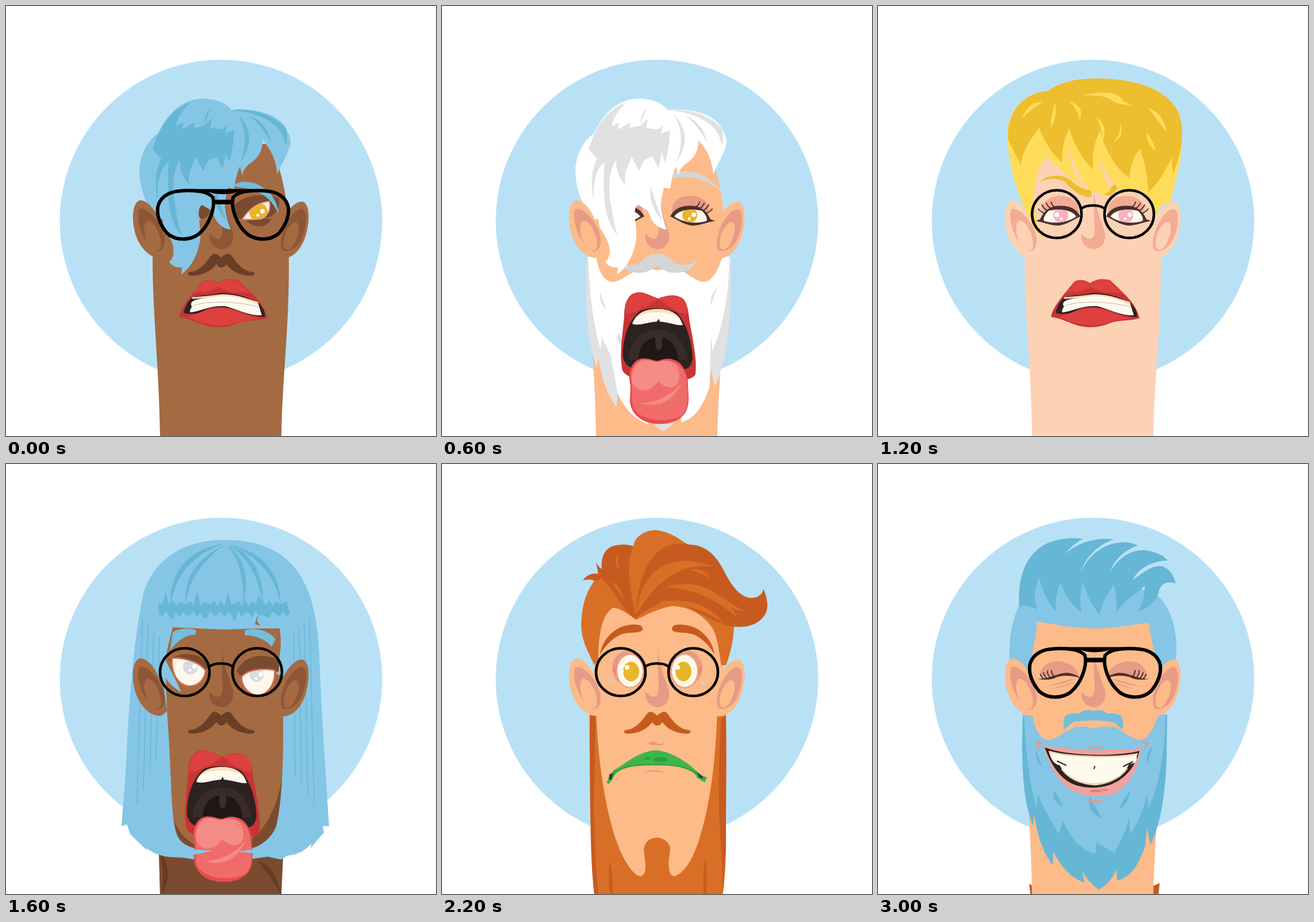
These frames come from a looping animation (748x748 px, 3.2 s). An HTML page with a canvas:

```html
<!DOCTYPE html>
<html lang="en">
<head>
<meta charset="utf-8">
<title>Mix and match faces</title>
<style>
html, body { margin: 0; width: 100%; height: 100%; overflow: hidden; background: #fff; }
canvas { display: block; width: 748px; height: 748px; }
</style>
</head>
<body>
<canvas id="stage" width="748" height="748"></canvas>
<script>
const ctx = document.getElementById('stage').getContext('2d');
const STEP = 200, DARK = '#2c2220', TOOTH = '#fffaee', CREAM = '#f9ddbc', LASH = '#4a302c';
const RED = '#de3f3f', DEEP_RED = '#c83434', GREEN = '#3fb549', DEEP_GREEN = '#2f9c43';

// base, shade, deep shade
const SKIN = {
  brown: ['#a46a41', '#8c5637', '#7b4b2f'],
  tan: ['#fcbb89', '#e69b86', '#e69b86'],
  light: ['#fdd2b4', '#f4ab96', '#f4ab96']
};
const TONE = {
  blue: ['#85c5e6', '#66b6d5'],
  white: ['#ffffff', '#e1e1e1'],
  blond: ['#ffdc5a', '#edbe2e'],
  orange: ['#d96f26', '#c75b1f']
};
const IRIS = { gold: '#e9b52a', pink: '#fbb0c2', grey: '#dadbe0' };

function fill(d, color) {
  ctx.fillStyle = color;
  ctx.fill(new Path2D(d));
}
function line(d, color, width) {
  ctx.strokeStyle = color;
  ctx.lineWidth = width;
  ctx.lineCap = 'round';
  ctx.stroke(new Path2D(d));
}
function oval(x, y, rx, ry, color) {
  ctx.fillStyle = color;
  ctx.beginPath();
  ctx.ellipse(x, y, rx, ry, 0, 0, Math.PI * 2);
  ctx.fill();
}
// Tapered strands: start, bend point, end and width of each
function leaves(color, list) {
  for (const item of list.split(',')) {
    const [x1, y1, cx, cy, x2, y2, w] = item.trim().split(' ').map(Number);
    const len = Math.hypot(x2 - x1, y2 - y1);
    const nx = (y1 - y2) / len * w, ny = (x2 - x1) / len * w;
    fill(`M${x1} ${y1}Q${cx + nx} ${cy + ny} ${x2} ${y2}Q${cx - nx} ${cy - ny} ${x1} ${y1}Z`, color);
  }
}
function eyeball(d, x, y, r, iris) {
  fill(d, '#fdf8ee');
  ctx.save();
  ctx.clip(new Path2D(d));
  oval(x, y, r, r, iris);
  glint(x + 7, y - 1);
  ctx.restore();
}
function glint(x, y) {
  oval(x, y, 4, 4, '#fff');
  oval(x - 8, y + 7, 2.5, 2.5, '#fff');
}
function both(draw, sum = 749) {
  draw();
  ctx.save();
  ctx.translate(sum, 0);
  ctx.scale(-1, 1);
  draw();
  ctx.restore();
}

function head([base]) {
  fill('M255 436C255 540 266 620 268 748L479 748C481 640 493 560 492 437L493 400C492 350 482 290 460 240L300 240C275 260 264 320 262 400Z', base);
}
function ears([base, shade]) {
  fill('M266 372C258 350 243 337 233 338C222 341 218 362 223 388C228 415 248 440 270 438L280 430L272 370Z', base);
  fill('M231 354C226 375 238 412 262 427C272 427 277 418 276 404C272 377 244 346 231 354Z', shade);
  fill('M246 373C237 378 239 400 249 417C253 425 264 430 269 421C273 408 262 375 246 373Z', base);
  fill('M482 372C492 350 508 337 518 341C529 348 528 375 522 397C516 420 500 440 481 439L470 436Z', base);
  fill('M517 354C526 360 522 395 510 412C503 423 487 430 480 424C474 405 485 375 503 358C508 354 513 352 517 354Z', shade);
  fill('M505 376C514 383 508 405 498 419C492 426 484 425 483 417C481 400 493 376 505 376Z', base);
}
function nose([, shade]) {
  fill('M376 322C377 350 388 372 395 395C397 412 388 423 375 423C362 422 352 412 354 396C361 404 369 408 374 402C380 395 374 365 376 322Z', shade);
}

const beards = {
  full([a, b], [base]) {
    const top = 'L268 436C273 465 283 480 297 480C315 478 325 464 345 457L410 457C425 463 440 479 455 480C470 480 480 460 488 436';
    fill(`M252 436${top}L503 436L502 510C500 580 490 630 474 663L468 632L465 664C452 700 440 718 416 725L415 706C406 724 396 734 384 740C372 732 362 722 355 706L359 728C335 720 318 700 305 674L304 698C290 680 277 650 272 610L269 630L262 605C254 580 248 520 252 436Z`, b);
    fill(`M254 436${top}L500 436C500 490 490 560 470 600L468 571C465 590 460 610 439 645L436 614C432 640 425 650 411 676C405 672 395 668 380 658L378 678C350 670 335 650 322 621L314 644C305 625 290 605 278 575L276 598C265 560 258 520 254 436Z`, a);
    if (a === TONE.white[0])
      fill('M290 590L306 675C318 700 335 720 359 727L355 706L415 706L416 724C440 716 452 700 465 664L468 571Z', a);
    leaves(b, '275 498 277 516 286 528 4, 478 490 469 505 468 521 4, 306 568 308 584 322 596 8, 438 568 432 587 418 602 6, 368 578 371 602 389 616 9');
    fill('M361 456Q376 463 389 456Z', base);
  },
  long([a, b], [base]) {
    fill('M257 436L494 436C496 550 493 640 494 660C494 700 490 748 488 748L265 748C260 700 258 620 257 436Z', a);
    fill('M257 436L267 437C266 540 260 620 272 748L265 748C259 700 257 620 257 436Z', b);
    fill('M486 440L494 440L494 660L488 748C490 650 474 640 486 440Z', b);
    leaves(b, '292 690 293 720 296 780 6, 458 686 457 720 458 780 6');
    fill('M268 430C272 540 290 620 305 660C318 695 335 717 345 717C358 715 354 695 351 672C352 655 365 650 374 650C386 650 398 660 397 672C393 690 392 717 405 717C420 712 435 690 445 660C462 610 475 540 479 430Z', base);
  }
};

// Left halves
const moustaches = {
  points: 'M375 438C368 432 362 428 357 434C346 449 336 462 318 463C314 468 320 470 326 469C342 468 356 462 366 449Q369 455 375 455Z',
  curl: 'M375 431C358 431 352 440 342 448C331 453 318 451 307 443C311 455 322 463 340 464C360 466 367 454 375 453Z',
  brush: 'M375 430C366 427 356 428 350 434C336 433 326 436 325 440C321 452 323 458 324 462C330 458 333 452 340 449Q358 446 375 446Z'
};

const mouths = {
  snarl() {
    fill('M301 541C303 525 322 503 341 480C350 474 360 476 369 482C380 474 394 474 404 477C425 498 448 515 455 543C440 548 420 546 405 551C385 560 365 561 345 555C330 550 315 542 301 541Z', DEEP_RED);
    fill('M325 501C335 487 342 478 350 477C358 476 364 480 369 484C380 475 392 475 403 478L426 500C410 496 390 502 369 488C355 502 340 494 325 501Z', RED);
    fill('M314 541C345 531 350 527 375 526C400 527 420 540 440 544C418 545 408 549 395 553C370 559 345 554 314 541Z', RED);
    fill('M309 534C312 520 320 507 330 505C350 502 360 503 374 499C395 499 420 505 440 517C448 525 452 536 450 541C440 541 420 537 400 529C380 521 355 522 340 532C330 537 318 536 309 534Z', DARK);
    fill('M322 520C320 507 355 509 374 502C400 502 422 510 438 515L445 538C420 539 400 526 380 522C355 521 340 530 322 533C316 531 326 524 322 520Z', TOOTH);
    line('M325 508C350 506 360 505 374 503C395 502 418 509 436 517', CREAM, 3);
    line('M324 522C350 512 400 513 438 523', '#d9cbb4', 1.5);
  },
  tongue() {
    fill('M317 540C317 520 322 503 336 499C350 495 362 504 376 509C390 503 405 500 418 508C428 518 428 530 431 550C436 580 444 615 441 640C436 660 325 660 314 634C308 610 314 570 317 540Z', DEEP_RED);
    fill('M319 535C319 512 326 500 345 498C357 500 364 506 376 509C390 503 410 502 420 510C427 517 427 529 427 536C417 536 406 529 396 524L376 509L354 524C340 529 330 537 319 535Z', RED);
    fill('M315 612C313 580 325 545 345 530C365 523 390 525 408 533C425 550 435 585 436 612C432 635 425 635 375 632C330 636 320 628 315 612Z', DARK);
    fill('M324 615C326 582 347 563 377 563C408 564 423 588 427 615Z', '#382b28');
    fill('M342 617C342 592 355 576 377 576C400 577 410 595 411 617Z', '#211715');
    fill('M371 575L383 575C382 584 385 598 377 599C369 598 372 584 371 575Z', '#3b302e');
    fill('M331 553C336 536 355 527 378 527C400 528 413 537 419 555C408 556 398 551 379 549L377 544L374 549C355 550 345 557 331 553Z', TOOTH);
    fill('M335 544C347 528 363 527 378 527C398 528 409 536 415 545C397 529 355 529 335 544Z', CREAM);
    fill('M326 650C324 630 335 612 352 613C362 613 370 618 377 617C386 613 395 612 405 616C420 622 428 640 428 660C428 675 432 690 424 706C415 722 395 728 375 727C350 726 330 712 327 690C326 680 330 668 326 650Z', '#e94b50');
    fill('M329 650C326 632 338 615 352 615C362 615 370 620 377 619C388 615 415 613 424 645C430 680 428 700 418 712C395 725 350 724 334 701C327 685 333 668 329 650Z', '#f06c6b');
    fill('M331 655C328 635 338 616 352 616C362 615 370 621 377 619C390 614 411 617 413 640C414 664 397 672 376 653C360 675 338 672 331 655Z', '#f58b86');
    leaves('#f58b86', '345 691 390 697 417 656 8');
    for (let i = 0; i < 12; i++)
      oval(i % 2 ? 400 + i * 1.8 : 338 + i * 6, i % 2 ? 624 + i * 2 : 672 + i * 3, 1, 1, '#e05558');
  },
  frown([, shade]) {
    fill('M286 554L298 533C318 523 340 500 372 498C400 500 430 520 450 541L461 545L457 554L444 546C440 537 430 531 415 527C400 522 345 521 325 527C310 531 300 538 297 548L290 557Z', GREEN);
    line('M298 537C325 522 345 524 372 523C410 523 425 527 447 541', DEEP_GREEN, 2);
    oval(380, 514, 12, 4.5, DEEP_GREEN);
    oval(358, 512, 5, 2.5, DEEP_GREEN);
    fill('M291 540L298 537L295 549L290 549ZM444 536L454 544L454 548L447 545Z', '#254a2b');
    fill('M358 486Q369 480 376 487L392 486Q374 493 358 486ZM352 536Q370 528 388 537Q370 534 352 536Z', shade);
  },
  scream([, shade]) {
    fill('M325 505C335 485 355 481 376 481C395 482 415 486 423 497C428 515 441 550 441 575C438 610 425 635 408 646C390 656 360 656 345 646C325 630 311 605 309 577C311 555 320 525 325 505Z', GREEN);
    fill('M331 513C338 498 355 494 376 493C395 493 412 499 420 509C425 530 438 555 438 576C435 605 420 624 412 630C395 638 355 638 340 630C325 615 314 597 312 577C314 550 325 530 331 513Z', DARK);
    fill('M323 590C325 550 335 517 376 516C415 517 425 550 428 590Z', '#382b28');
    fill('M346 582C346 562 355 550 374 548C395 550 405 565 405 582Z', '#211715');
    oval(375, 552, 5, 7, '#3b302e');
    fill('M332 520C336 505 355 497 376 497C398 498 417 505 422 520C422 526 414 523 408 522C390 516 360 516 345 522C338 524 331 526 332 520Z', TOOTH);
    fill('M336 511C345 500 360 497 376 497C395 498 410 502 418 511C400 502 355 502 336 511Z', CREAM);
    fill('M321 598C325 580 345 575 360 577C368 579 372 582 375 583C380 577 395 575 410 579C427 584 432 592 428 604C410 615 345 617 321 602Z', RED);
    fill('M323 597C328 582 350 577 361 580L375 588C382 578 400 577 411 582C423 586 430 594 426 601C405 609 345 613 323 597Z', '#f4827e');
    oval(390, 601, 15, 4, '#f9a29d');
    fill('M324 605C350 616 400 616 427 603C424 618 415 630 395 633C370 636 345 633 335 624C328 618 325 610 324 605Z', TOOTH);
    line('M333 622C350 634 400 636 419 620', CREAM, 3);
    oval(375, 648, 10, 3, DEEP_GREEN);
    leaves(shade, '304 558 297 575 306 594 4, 445 553 453 569 446 587 4, 349 660 372 666 400 658 3');
  },
  smile([, shade]) {
    fill('M288 490C295 520 315 560 345 571C365 580 395 580 410 574C440 560 455 520 459 493C440 500 410 494 375 499C340 496 315 493 288 490Z', '#f0a19c');
    fill('M290 493C302 527 320 551 345 559C365 565 385 564 404 558C432 547 448 525 455 499C420 509 330 509 290 493Z', DARK);
    fill('M297 499C330 511 420 512 452 503C448 510 452 515 447 520L437 522C425 546 400 558 377 559C345 558 325 540 316 524C305 522 300 512 297 499Z', TOOTH);
    line('M320 531C345 565 407 566 433 530M298 500C335 511 420 511 451 504', '#e8cfad', 2.5);
    line('M312 517L327 524M376 530L377 526M443 518L427 526', DARK, 2);
    oval(379, 569, 10, 2.5, '#de7f7c');
    oval(395, 567, 5, 1.8, '#de7f7c');
    both(() => fill('M273 486Q285 478 288 488Q276 482 281 498Z', shade), 745);
    fill('M357 490Q376 496 395 490L377 498ZM357 582Q378 589 400 582L379 592Z', shade);
  }
};

const eyes = {
  angry([, , deep], iris) {
    both(() => {
      fill('M394 352C404 331 440 324 474 334C480 350 465 368 455 368L413 370C402 372 394 364 394 352Z', deep);
      fill('M418 374C435 369 450 369 462 371C452 386 435 388 418 374Z', deep);
      const lens = 'M413 370C425 352 440 343 457 341C460 352 455 364 445 369C435 371 420 370 413 370Z';
      line(lens, '#ec8a7c', 4);
      eyeball(lens, 439, 358, 16, iris);
    });
  },
  sultry([, shade], iris) {
    both(() => {
      oval(432, 354, 32, 24, shade);
      fill('M397 366C405 350 420 346 440 348C455 351 462 360 467 371L475 374C460 376 450 382 435 382C420 380 410 372 397 366Z', LASH);
      eyeball('M404 366C412 355 430 352 452 356C460 364 462 370 460 374C445 379 420 378 404 366Z', 431, 364, 13, iris);
      line('M442 349Q446 348 448 341M448 352Q454 349 456 343M454 356Q460 353 464 346M459 361Q466 358 470 353', LASH, 2);
    });
  },
  tired([, , deep], iris) {
    const left = 'M290 339C300 337 335 343 346 360C343 378 330 386 317 385C300 382 289 365 290 339Z';
    const right = 'M411 371C420 358 450 356 466 360C468 380 455 401 438 401C422 400 411 385 411 371Z';
    fill('M283 342C300 325 343 326 352 353C346 364 330 345 283 342Z', deep);
    fill('M401 361C410 338 442 324 476 342L474 362C450 353 420 357 411 370Z', deep);
    line(left + right, '#d9694f', 5);
    eyeball(left, 321, 353, 13, iris);
    eyeball(right, 436, 367, 12, iris);
  },
  wide([, shade], iris) {
    both(() => {
      oval(325, 355, 29, 31, shade);
      fill('M305 348L297 359L307 374Z', '#f0806a');
      oval(327, 360, 25, 30, '#f49c82');
      oval(327, 360, 22, 28, '#fff8ea');
      oval(329, 361, 14, 17, iris);
    });
    glint(322, 354);
    glint(410, 354);
    leaves('#b9e1f6', '287 375 292 378 297 376 2, 452 376 454 381 458 385 2');
  },
  closed([, shade]) {
    both(() => {
      fill('M281 367C285 346 308 337 333 348C345 355 350 365 350 372C330 362 305 374 281 367Z', shade);
      leaves(shade, '293 387 325 380 343 373 3, 303 391 330 385 343 378 2');
      fill('M277 373C296 376 318 360 334 364C343 366 349 369 351 372C334 367 318 367 306 373C296 376 286 376 277 373Z', LASH);
      line('M287 372Q283 369 283 366M293 372Q288 367 288 363M299 371Q294 365 295 360M306 369Q301 363 302 359', LASH, 2);
    });
  }
};

const brows = {
  sweep: 'M396 313C405 302 430 304 447 316C465 328 473 345 474 362C465 340 450 327 430 320C418 315 405 316 396 313Z',
  thin: 'M400 291C415 285 440 286 455 296C470 305 478 312 484 321C470 310 455 303 440 299C425 296 410 299 400 300Z',
  cross: 'M281 306C295 293 320 291 335 303C345 313 358 320 370 320L372 332C358 336 340 322 325 306C312 298 296 300 281 306ZM393 329L414 307L420 314L405 330Z',
  flat: 'M290 293C300 285 325 284 331 290L329 297C315 297 300 305 285 325ZM415 290C425 284 455 286 469 305L462 318C450 303 430 298 416 298Z',
  round: 'M275 332C278 305 300 285 320 281C340 277 350 280 349 288C345 296 325 291 310 297C295 304 282 318 275 332Z',
  thick: 'M301 298C303 290 310 288 315 291C330 297 345 295 357 298L355 313C335 315 315 312 306 306ZM385 293C400 300 420 294 435 294L430 303C418 312 400 320 383 316Z'
};

const hairs = {
  side([a, b]) {
    fill('M264 222C285 180 310 161 345 161C368 162 385 170 392 181C410 178 440 180 465 192C480 200 488 212 490 220C495 228 497 236 493 246C488 262 477 278 472 293C470 270 462 250 446 233C447 250 440 262 430 270C420 276 412 285 411 295L407 279C400 295 398 310 397 318L386 316C382 335 380 342 381 351C383 368 388 380 391 389C378 388 366 378 362 365L358 356L341 346L337 350C332 365 340 385 338 405C334 430 325 452 305 467L306 455C295 455 288 452 284 445C290 440 294 430 290 415C283 395 270 380 262 365C240 345 232 310 232 285C233 260 245 235 264 222Z', a);
    fill('M255 250C265 215 285 180 320 168C308 180 300 190 295 209L308 203L306 215L328 202L327 212L345 208L358 196L355 212L376 215L384 208L381 222L397 216C395 235 395 250 388 272L382 255L377 282L366 262L352 268L343 287L330 262L325 275C318 290 316 300 320 312C308 300 302 285 303 268C290 285 288 320 295 350C298 370 300 385 306 400C285 375 278 340 283 272C268 280 262 310 264 340C258 310 260 285 270 265Z', b);
    fill('M393 181C425 177 465 188 487 213C490 225 490 240 486 242C484 215 460 195 420 185Z', b);
    leaves(b, '404 190 432 225 408 272 7, 424 191 451 207 461 238 5, 357 178 348 187 345 206 3, 364 315 363 340 384 375 7');
  },
  crop([a, b]) {
    const top = 'C225 185 250 152 295 148C325 126 365 126 385 126C450 127 500 145 520 180C532 205 529 225 ';
    fill(`M225 225${top}526 268C520 300 512 325 507 347C500 336 488 350 482 368C478 345 475 335 470 330L440 318L420 328L418 318C408 305 395 290 383 262C388 290 400 310 405 320L392 328L372 322C355 305 340 280 334 246C333 275 342 300 362 320L345 308C325 290 305 275 293 262C275 285 272 310 271 345C272 365 278 385 288 402C272 395 262 375 255 350C240 320 226 270 225 225Z`, a);
    fill(`M226 232${top}528 235C525 260 520 275 513 292L511 262C500 290 485 310 470 325C470 300 465 275 456 248C445 262 440 275 437 299C415 285 395 250 386 217C375 240 372 262 374 285C355 265 340 240 333 213C322 235 320 250 320 272C300 255 290 235 280 212C268 230 250 250 249 277Z`, b);
    fill('M356 155C385 149 410 148 422 159Q429 169 441 172C425 173 412 169 404 162C392 155 374 156 356 155Z', a);
    leaves(a, '286 167 266 171 250 196 7, 308 168 306 195 300 212 6, 333 167 354 176 351 200 7, 380 193 395 210 391 234 6, 470 177 492 193 502 220 8, 421 204 427 226 408 238 4, 467 219 473 238 483 252 7');
  },
  bob([a, b], [base, , deep]) {
    fill('M289 610C300 650 330 672 375 675C430 670 470 620 481 540L484 640L479 748L268 748L265 640Z', deep);
    leaves('#653c26', '268 675 285 710 271 748 9, 438 690 462 705 478 748 9');
    fill('M380 132C310 132 255 165 238 230C222 310 215 400 210 500C207 560 203 600 201 630L210 627L217 645L245 672L244 668C265 685 290 684 310 685L350 692L325 680L360 673C340 672 310 668 300 650C285 620 290 560 280 430L277 345L281 320L290 284L380 288L436 286L476 286C480 310 478 330 470 365L485 370L482 430C483 520 480 590 470 630C458 660 430 672 400 674L430 677L408 690L455 683L478 688L490 681C510 680 525 668 531 660L530 668L553 641L551 630L562 630C558 560 548 430 545 330C540 220 510 132 380 132Z', a);
    let band = 'M266 241';
    for (let i = 1; i < 38; i++) band += `L${266 + i * 6} ${242 + 5 * Math.sin(i * 2.7) - (i % 9 === 2 ? 15 : 0)}`;
    for (let i = 38; i >= 0; i--) band += `L${266 + i * 6} ${261 + 6 * Math.sin(i * 2.4) + (i % 9 === 4 ? 10 : 0)}`;
    fill(band + 'Z', b);
    leaves(b, '378 139 291 160 285 250 9, 380 141 313 180 313 243 7, 384 141 422 172 413 245 7, 386 141 442 165 447 245 8, 388 140 470 165 478 245 8');
    for (let i = 0; i < 4; i++)
      line(`M${237 + i * 10} ${270 + i * 10}L${228 + i * 11} ${590 - i * 25}M${528 - i * 9} ${268 + i * 9}L${536 - i * 11} ${590 - i * 15}`, b, 1.3);
    fill('M433 279L438 262L437 274L442 281Z', base);
  },
  quiff([a, b]) {
    fill('M258 335C245 310 240 290 243 265C246 240 250 225 265 203L278 182C290 150 310 140 333 143C335 125 355 115 372 115C395 117 412 130 428 140L508 283C507 310 500 335 494 350L486 350C482 330 480 300 470 285C455 262 430 248 400 247C375 252 355 262 338 271C325 262 310 250 297 250C280 262 272 290 272 340L265 350Z', a);
    fill('M265 203C258 200 250 202 245 202C253 192 262 189 272 191L268 171C272 178 275 182 278 182C276 160 285 145 300 142C315 139 325 140 333 143C318 175 328 220 338 271C310 250 297 215 278 200Z', b);
    fill('M337 268C340 180 375 128 428 140C455 140 475 155 490 185C505 215 520 233 540 233C552 232 558 225 559 217C567 235 568 250 563 260C552 280 530 285 508 283C470 278 440 250 400 238C375 240 355 255 337 268Z', b);
    fill('M338 262C344 190 390 148 474 179C415 170 370 205 338 262Z', a);
    leaves(a, '387 214 465 205 515 268 14, 375 241 450 235 492 279 9, 306 156 300 172 309 185 4, 295 205 307 214 316 236 5, 432 184 452 184 467 199 5, 486 229 500 250 527 256 6');
  },
  curls([a, b]) {
    line('M278 262C240 265 232 228 268 226L285 232M468 186C500 170 525 182 523 205M526 203C555 210 570 230 558 250M240 257C208 260 210 300 238 325M575 285C600 288 596 330 570 345', a, 5);
    line('M228 325C218 370 225 430 267 471M236 410C245 440 252 455 262 470', a, 7);
    fill('M290 262C283 245 278 235 285 215C292 195 310 182 333 183C345 165 370 160 390 162C430 165 455 172 465 185C500 180 525 200 528 218C555 235 570 255 575 285C590 310 590 330 575 343C600 345 610 370 600 390C592 405 588 402 590 415C600 430 590 455 570 458C575 475 560 490 530 490C505 490 490 475 488 462C478 455 470 430 466 400C465 370 460 345 455 330C445 305 430 300 410 300C385 290 375 265 350 253C330 248 315 255 303 267C285 272 270 295 270 320C285 345 285 370 272 378L250 340C235 325 222 310 220 285C213 270 220 255 240 258C240 235 255 225 275 225Z', a);
    leaves(b, '338 181 395 160 414 190 12, 332 210 385 210 410 185 9, 285 258 300 200 333 184 8, 315 250 360 212 448 226 10, 363 252 420 280 480 232 14, 400 290 490 300 530 240 12, 468 190 508 190 533 250 7, 440 305 475 315 485 352 11, 460 305 520 320 530 415 14');
    leaves(b, '500 333 575 315 570 255 12, 528 372 585 380 601 352 11, 520 405 570 415 600 390 9, 488 438 550 455 592 425 14, 490 466 525 490 569 466 7, 222 282 230 250 265 262 7, 228 302 260 310 280 270 9, 242 327 258 335 271 300 9');
  },
  pomp([a, b]) {
    fill('M246 245C232 275 228 300 229 340C240 338 255 350 262 365L272 310L277 274C310 280 340 285 375 286C410 286 440 280 471 276C475 310 485 340 490 365C500 345 510 340 518 342C522 300 515 260 490 232L400 190L270 190Z', a);
    fill('M246 250C242 200 255 160 290 140C310 130 335 127 356 130C340 140 330 150 325 157C350 135 380 128 410 131C385 140 360 160 353 190C365 155 400 135 430 136Q445 137 452 142C430 148 408 170 405 186C420 160 445 148 465 150C485 153 498 160 504 168C475 168 450 185 443 202C465 185 480 175 495 178C512 185 515 198 518 208C500 202 490 210 488 225C482 240 470 250 452 257C460 245 464 230 464 212C450 225 425 240 415 259C415 240 415 225 410 210C400 225 390 240 385 262C372 245 362 225 356 203C352 225 350 240 354 258C335 245 325 225 317 206C310 225 308 240 310 257C295 240 285 220 281 198C272 215 270 235 277 253C260 245 250 245 246 250Z', b);
  }
};

const glasses = {
  aviator() {
    both(() => line('M300 322C330 319 352 323 360 333C364 350 355 380 335 397C320 408 295 409 280 395C268 380 262 365 264 350C267 335 280 324 300 322Z', '#000', 6), 755);
    line('M325 321L430 321', '#000', 5);
    fill('M345 321L410 321Q377 334 345 321Z', '#000');
    line('M364 341L391 341', '#000', 8);
  },
  round() {
    both(() => line('M354 362A43 41.5 0 1 1 268 362A43 41.5 0 1 1 354 362Z', '#000', 4.5), 748);
    line('M353 353C362 345 386 345 395 353', '#000', 4.5);
  }
};

// skin, hair, tone, eyes, iris, brow, glasses, beard, moustache, mouth
const CAST = `
brown side blue angry gold sweep aviator - points snarl
light crop blond tired gold round round - - scream
tan quiff orange wide gold round aviator - points snarl
tan side white sultry gold thin - full curl tongue
brown curls blue tired gold thick round - - scream
tan quiff orange wide gold round aviator long points frown
light crop blond sultry pink cross round - - snarl
tan pomp blue closed gold - aviator full brush smile
brown bob blue tired grey flat round - points tongue
light crop blond sultry pink cross aviator - - tongue
tan pomp orange wide gold round round - points snarl
tan quiff orange wide gold round round long points frown
brown side blue angry gold sweep round - points snarl
brown crop blond tired grey flat round - - tongue
brown curls blue tired gold thick aviator - - scream
tan pomp blue closed gold - aviator full brush smile`.trim().split('\n').map(row => row.split(' '));

function draw(i) {
  const [skin, hair, tone, eye, iris, brow, specs, beard, tache, mouth] = CAST[i];
  const s = SKIN[skin], t = TONE[tone];
  const browTone = tone === 'white' ? '#d5d5d5' : tone === 'blue' ? '#74bddc' : t[1];
  ctx.fillStyle = '#fff';
  ctx.fillRect(0, 0, 748, 748);
  oval(374, 374, 280.5, 280.5, '#b9e1f6');
  if (i > 11) fill('M263 730L270 734L270 748L265 748ZM490 729L478 734L478 748L488 748Z', TONE.orange[1]);
  head(s);
  if (beard !== '-') beards[beard](t, s);
  nose(s);
  if (tache !== '-') both(() => fill(moustaches[tache], skin === 'brown' ? '#693f28' : browTone));
  if (hair === 'bob') hairs.bob(t, s);
  mouths[mouth](s);
  eyes[eye](s, IRIS[iris]);
  if (brow === 'round') both(() => fill(brows.round, browTone));
  else if (brow !== '-') fill(brows[brow], browTone);
  // The bob lies behind the mouth; only its loose tips fall in front
  if (hair === 'bob') fill('M277 340C287 360 297 378 305 397C285 385 270 370 268 340ZM300 668L360 673L325 680ZM455 668L400 674L430 677Z', t[0]);
  else hairs[hair](t, s);
  ears(s);
  if (specs !== '-') glasses[specs]();
}

let shown = -1;
const start = performance.now();
function tick(now) {
  const i = Math.floor(Math.max(0, now - start) / STEP) % CAST.length;
  if (i !== shown) draw(shown = i);
  requestAnimationFrame(tick);
}
tick(start);
</script>
</body>
</html>
```
